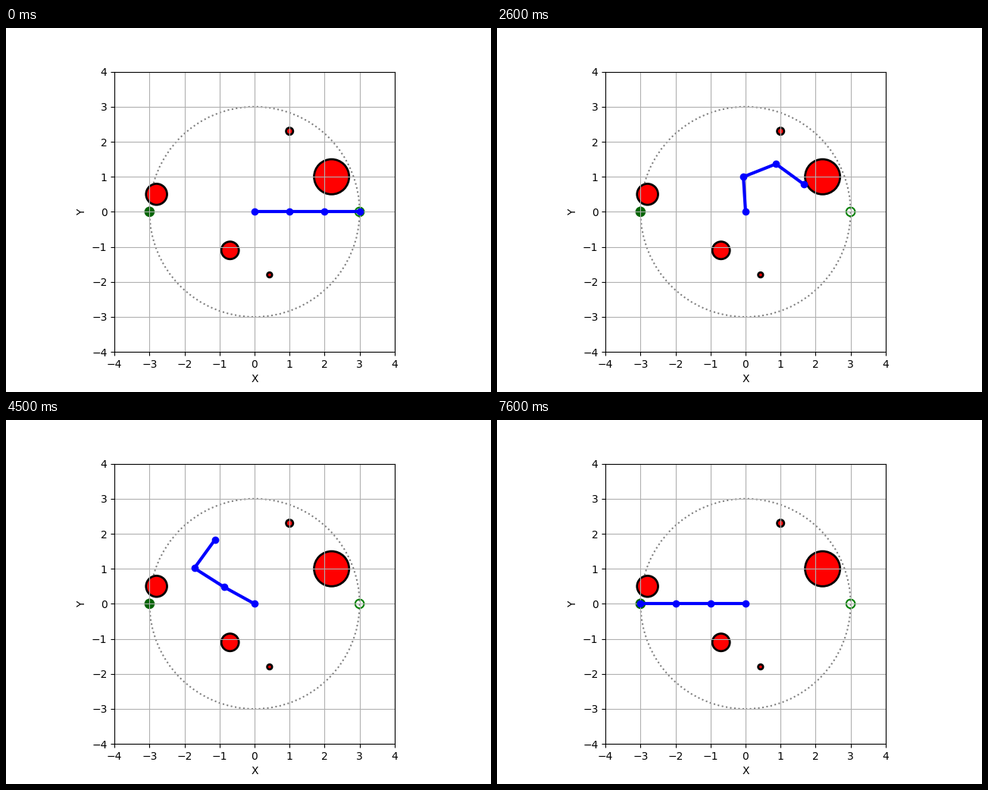
Write a matplotlib script that moves like this. It is 640 px wide and 480 px high and loops after 7700 ms.

```python
import numpy as np
import matplotlib.pyplot as plt
from matplotlib.animation import FuncAnimation
from matplotlib.patches import Circle

FRAMES = 77
STEP = 2 * np.pi / 100  # joint angles live on a 100-cell grid

# turning points of each joint: times, grid cells
JOINTS = (
    ((0, 26, 40, 54), (0, 26, 39, 50)),
    ((0, 16, 25, 55, 76), (0, -16, -21, 9, 0)),
    ((0, 14, 26, 32, 45, 56, 76), (0, -12, -16, -15, -26, -20, 0)),
)

# x, y, radius
OBSTACLES = (
    (2.2, 1.0, 0.5),
    (-2.8, 0.5, 0.3),
    (1.0, 2.3, 0.1),
    (-0.7, -1.1, 0.25),
    (0.43, -1.8, 0.07),
)


def arm_points(t):
    cells = [np.floor(np.interp(t, *joint) + 1e-9) for joint in JOINTS]
    links = np.exp(1j * STEP * np.cumsum(cells))
    points = np.append(0, np.cumsum(links))
    return points.real, points.imag


fig, ax = plt.subplots(figsize=(6.4, 4.8), dpi=100)
ax.set_aspect("equal")
ax.set(xlim=(-4, 4), ylim=(-4, 4), xlabel="X", ylabel="Y")
ax.grid(True)


def add_circle(x, y, r, lw=1.5, **style):
    ax.add_patch(Circle((x, y), r, lw=lw, **style))


add_circle(0, 0, 3, fill=False, ec="gray", ls=":")
for x, y, r in OBSTACLES:
    add_circle(x, y, r, lw=2, fc="red", ec="black")
add_circle(3, 0, 0.125, fill=False, ec="green")
add_circle(-3, 0, 0.125, fc="darkgreen", ec="darkgreen")

arm, = ax.plot([], [], "o-", color="blue", lw=3, ms=6)


def update(i):
    arm.set_data(*arm_points(i))
    return arm,


anim = FuncAnimation(fig, update, frames=FRAMES, interval=100, repeat=True,
                     repeat_delay=0)
plt.show()
```
